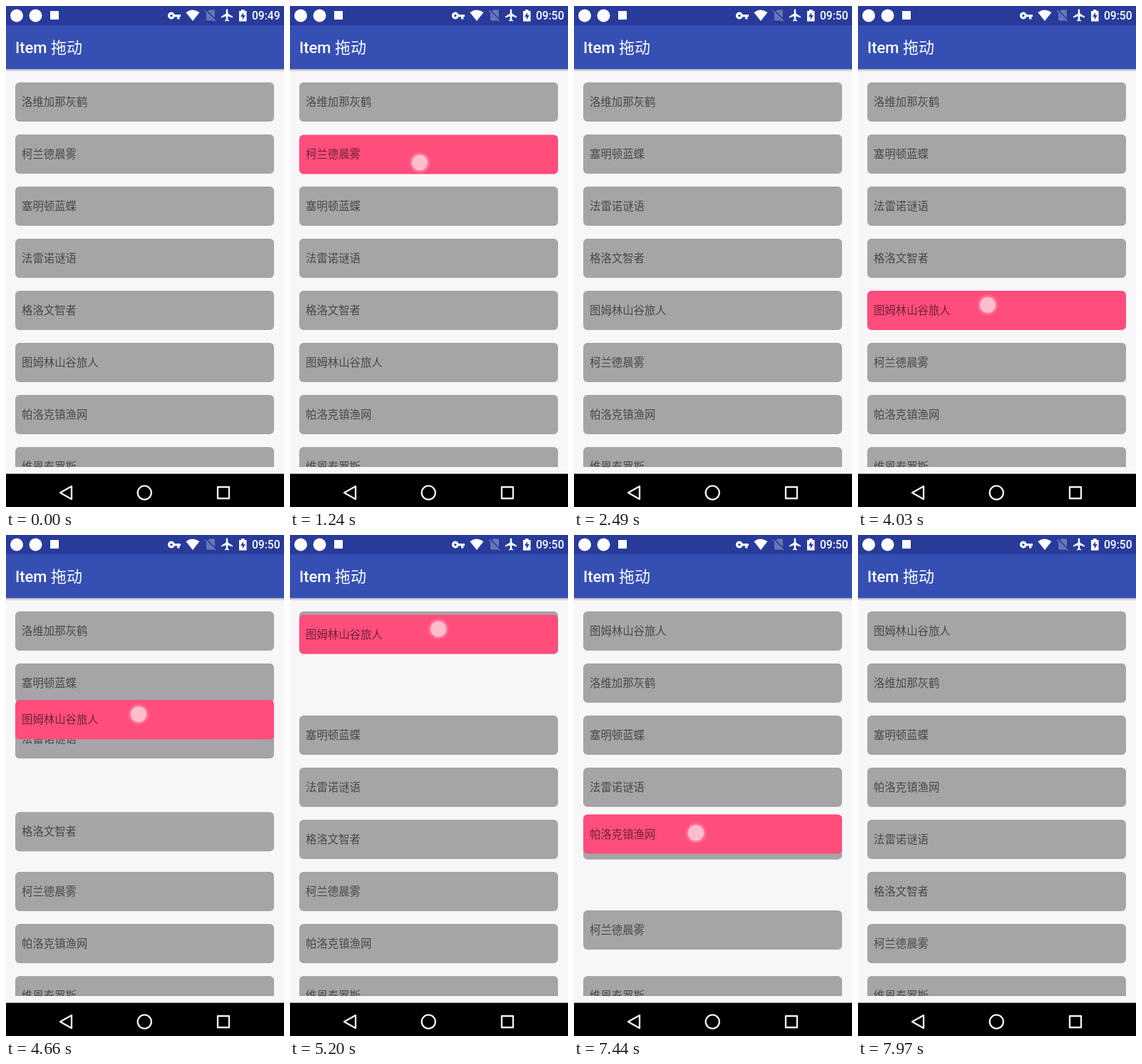
These frames come from a looping animation (390 px wide and 702 px high, 8050 ms). An HTML page:

```html
<!DOCTYPE html>
<html lang="zh-CN">
<head>
<meta charset="utf-8">
<title>Item 拖动</title>
<style>
html, body { margin: 0; width: 100%; height: 100%; overflow: hidden; }
svg { display: block; }
text { font-family: Roboto, "Noto Sans CJK SC", "Noto Sans CJK", sans-serif; }
#list rect { fill: #a6a4a6; }
#list .held rect { fill: #ff4d7c; }
#list text { font-size: 15.4px; fill: #000; fill-opacity: .56; }
</style>
</head>
<body>
<svg width="390" height="702" viewBox="0 0 390 702">
  <defs>
    <clipPath id="view"><rect y="88" width="390" height="558"/></clipPath>
    <linearGradient id="shade" x2="0" y2="1">
      <stop stop-color="#000" stop-opacity=".24"/><stop offset="1" stop-color="#000" stop-opacity="0"/>
    </linearGradient>
  </defs>
  <rect width="390" height="702" fill="#f8f6f9"/>
  <g clip-path="url(#view)"><g id="list"></g></g>

  <rect y="88.5" width="390" height="4" fill="url(#shade)"/>
  <rect y="27" width="390" height="61.5" fill="#354fb3"/>
  <rect width="390" height="27" fill="#283b9a"/>
  <text x="13" y="66" font-size="22" font-weight="500" fill="#fff">Item <tspan x="63" font-weight="400">拖动</tspan></text>

  <g fill="#fff">
    <circle cx="15" cy="13.5" r="9"/>
    <circle cx="41.5" cy="13.5" r="9"/>
    <rect x="62" y="7" width="12" height="12"/>
    <path transform="translate(226.2 3.7) scale(.82)" d="M12.65 10C11.83 7.67 9.61 6 7 6c-3.31 0-6 2.69-6 6s2.69 6 6 6c2.61 0 4.83-1.67 5.65-4H17v4h4v-4h2v-4H12.65zM7 14c-1.1 0-2-.9-2-2s.9-2 2-2 2 .9 2 2-.9 2-2 2z"/>
    <path d="M252.500 9Q262 2 271.500 9L262 21z"/>
    <path transform="translate(276.8 2.6) scale(.85)" opacity=".3" d="M19 5c0-1.100-.9-2-2-2h-7L7.660 5.340 19 16.680zM3.650 3.880L2.380 5.150 5 7.770V19c0 1.100.9 2 2 2h10c.35 0 .67-.1.960-.26l1.880 1.880 1.270-1.270z"/>
    <path transform="translate(300.2 2.8) scale(.85)" d="M21 16v-2l-8-5V3.500c0-.83-.67-1.500-1.500-1.500S10 2.670 10 3.500V9l-8 5v2l8-2.500V19l-2 1.500V22l3.500-1 3.500 1v-1.500L13 19v-5.500l8 2.500z"/>
    <path d="M327 7h3V5h4.500v2h3v14.500h-10.500z"/>
    <path d="M333 9l-4 6h2.800v4.500l4-6.500h-2.800z" fill="#283b9a"/>
    <text id="clock" x="345" y="19.3" font-size="15.600" font-weight="500"></text>
  </g>

  <rect y="655.5" width="390" height="46.5"/>
  <g fill="none" stroke="#f4f4f4" stroke-width="2.3" stroke-linejoin="round">
    <path d="M76 682L92 673V691z"/>
    <circle cx="194.3" cy="682" r="9.6"/>
    <rect x="297" y="674" width="16" height="16"/>
  </g>
  <g id="finger" fill="#fff">
    <circle r="15" opacity=".12"/>
    <circle r="12.500" opacity=".16"/>
    <circle r="11" opacity=".5"/>
  </g>
</svg>
<script>
const LOOP = 8050, PITCH = 73, TOP = 107, SLIDE = 250;
const names = ['洛维加那灰鹤', '柯兰德晨雾', '塞明顿蓝蝶', '法雷诺谜语',
  '格洛文智者', '图姆林山谷旅人', '帕洛克镇渔网', '维恩泰罗斯'];

// Each stroke of the finger is eased from start over ms, by dx and dy.
const drags = [
  { item: 1, slots: 4, touch: 480, lift: 1030, end: 2490, x: 182, grip: 39,
    strokes: [{ start: 1218, ms: 927, dx: 0, dy: 312 }] },
  { item: 5, slots: -4, touch: 3400, lift: 3950, end: 5740, x: 182, grip: 20,
    strokes: [{ start: 4199, ms: 756, dx: 6, dy: -250 }, { start: 5050, ms: 290, dx: 38, dy: -70 }] },
  { item: 6, slots: -3, touch: 6340, lift: 6980, end: 7970, x: 165, grip: 26,
    strokes: [{ start: 7000, ms: 720, dx: 9, dy: -228 }] },
];

const $ = id => document.getElementById(id);
const ease = p => (1 - Math.cos(Math.PI * Math.min(1, Math.max(0, p)))) / 2;
const travel = (strokes, axis, t) =>
  strokes.reduce((sum, s) => sum + s[axis] * ease((t - s.start) / s.ms), 0);

const list = $('list');
const cards = names.map(name => {
  const g = document.createElementNS('http://www.w3.org/2000/svg', 'g');
  g.innerHTML = `<rect x="13" width="363" height="55" rx="6"/><text x="22" y="33">${name}</text>`;
  list.append(g);
  return g;
});

// A neighbour gives way as soon as the dragged card has fully passed its slot.
const order = names.map((_, i) => i);
for (const drag of drags) {
  const { item, slots, strokes, touch } = drag;
  drag.dir = Math.sign(slots);
  drag.release = drag.end - SLIDE;
  drag.swaps = [];
  let slot = order.indexOf(item), t = touch;
  for (let k = 1; k <= Math.abs(slots); k++) {
    while (t < drag.release && Math.abs(travel(strokes, 'dy', t)) < k * PITCH) t += 2;
    const card = order[slot + drag.dir];
    drag.swaps.push({ card, t });
    order[slot] = card;
    order[slot += drag.dir] = item;
  }
}

function render(t) {
  const y = names.map((_, i) => TOP + i * PITCH);
  let held = -1, point = null;
  for (const { item, slots, dir, touch, lift, release, end, x, grip, strokes, swaps } of drags) {
    if (t < touch) break;
    for (const swap of swaps) y[swap.card] -= dir * PITCH * ease((t - swap.t) / SLIDE);
    const offset = travel(strokes, 'dy', t);
    y[item] += offset + (slots * PITCH - offset) * ease((t - release) / SLIDE);
    if (t >= lift && t < end) held = item;
    if (t < release) point = [x + travel(strokes, 'dx', t), y[item] + grip];
  }

  $('clock').textContent = t < 780 ? '09:49' : '09:50';
  cards.forEach((card, i) => {
    card.setAttribute('transform', `translate(0 ${y[i]})`);
    card.classList.toggle('held', i === held);
  });
  if (held >= 0 && list.lastChild !== cards[held]) list.append(cards[held]);

  $('finger').style.display = point ? '' : 'none';
  if (point) $('finger').setAttribute('transform', `translate(${point})`);
}

const begin = performance.now();
function tick() {
  render((performance.now() - begin) % LOOP);
  requestAnimationFrame(tick);
}
tick();
</script>
</body>
</html>
```
